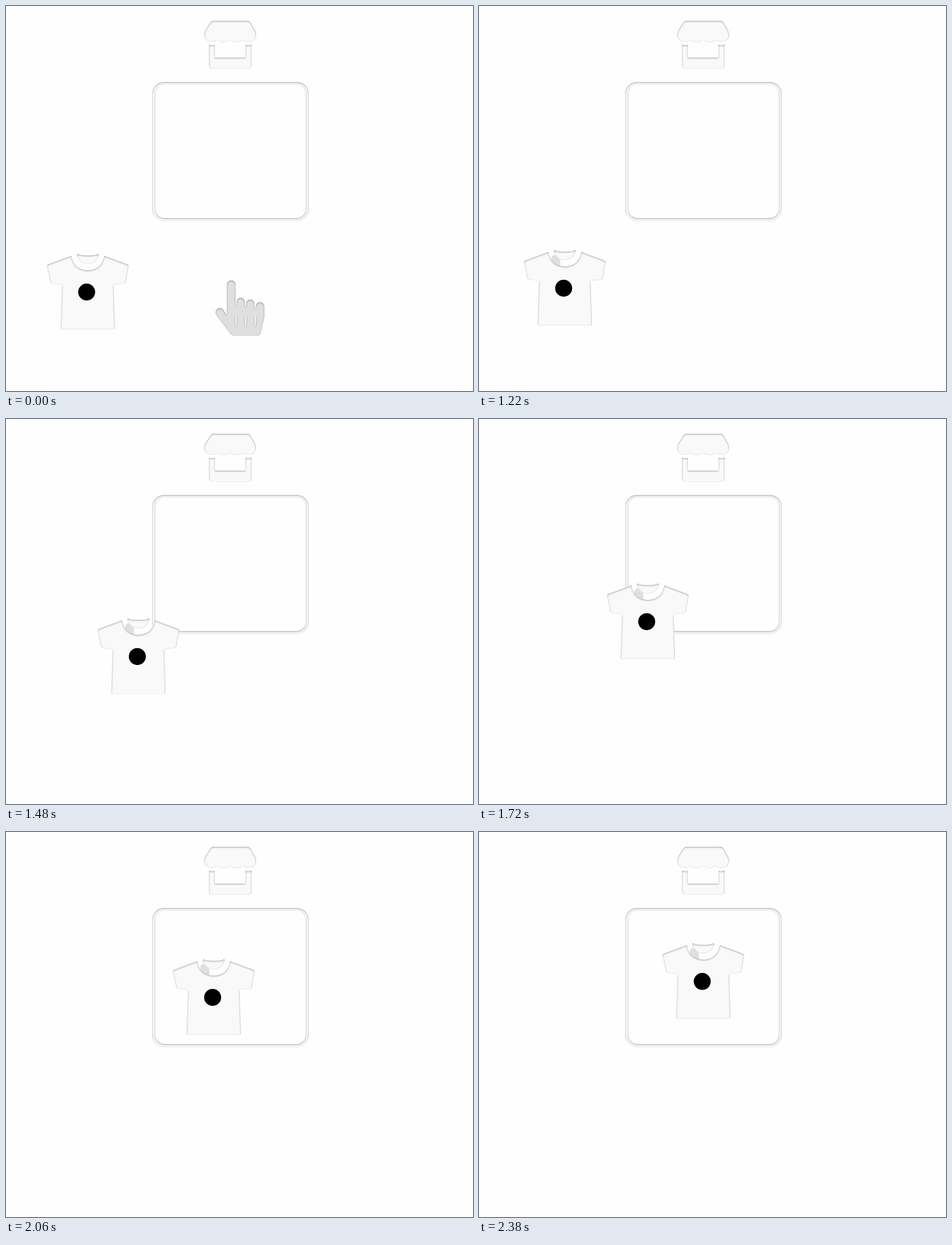
Recreate the animation shown at these times as an HTML page with a canvas. Size 825 px wide and 679 px high, loop 2400 ms.

```html
<!DOCTYPE html>
<html lang="en">
<head>
<meta charset="utf-8">
<title>Shirt to shop</title>
<style>
html, body { margin: 0; width: 100%; height: 100%; overflow: hidden; background: #fefefe; }
canvas { display: block; }
</style>
</head>
<body>
<canvas id="stage" width="825" height="679"></canvas>
<script>
const ctx = document.getElementById('stage').getContext('2d');
const LOOP = 2400, STEP = 20, FAR = 3000;
const PAPER = '#fefefe', LIGHT = '#f9f9f9', GREY = '#dfdfdf';

const awning = new Path2D(`M367 26H426Q430 26 432 29L440 43Q442 47 442 51C442 58 437 63 431 63
  Q424 64 419 60Q413 64 407.500 64Q401 64 396 60Q391 64 384.500 64Q378 64 373 60Q368 64 361 63
  C355 63 350 58 350 51Q350 47 352 43L361 29Q363 26 367 26Z`);
const counter = new Path2D(`M358.500 68Q364 70 369 68.500V91H423V68.500Q428 70 434 68V104
  Q434 111 427 111H366Q358.500 111 358.500 104Z`);

const frame = new Path2D();
frame.roundRect(258, 134, 277, 245.5, 21);
frame.roundRect(264, 139, 265.5, 235, 16);

const collar = new Path2D(`M126 437Q130 440 145 440Q159 440 163 437Q165 439 163 442
  C160 450 154 455 145 455C135 455 129 450 126 443Q124 439 126 437Z`);
const shirt = new Path2D(`M115.500 440.500C118 457 129 466 145 466C160 466 171 457 173.500 440.500
  L214 455.500Q217 457 216.500 460L212 486Q211.500 489 208 489.500L190 491.500L192.500 567
  Q192.500 570.500 189 570.500H100Q96.500 570.500 96.500 567L99 491.500L82 489.500
  Q78.500 489 78 486L72.700 460Q72 457 75 455.500Z`);
const thumb = new Path2D('M121 452Q121 446 126 446Q129 446 131 449L136.500 454.500V469L121 460Z');

const hand = new Path2D(`M390 545V491.500A7.750 7.750 0 0 1 405.500 491.500V528L407 529V522
  A7.500 7.500 0 0 1 422 522V529L424 530V525A7.500 7.500 0 0 1 439 525V532L441 533V530
  A7.700 7.700 0 0 1 456.500 530V549L449.500 577Q448 581.500 444 581.500H403
  Q399 581.500 396 578L372 546C369 541 370 535 375 533Q380 531.500 383 535Z`);
for (const x of [405.5, 422.5, 439.5]) hand.rect(x, 546, 1.8, 18);

// Filled shape with a soft shadow falling inward from its upper edges.
function emboss(path, color, dx = 0, dy = 0) {
  const outside = new Path2D();
  outside.rect(-500, -500, 2000, 2000);
  outside.addPath(path);
  ctx.save();
  ctx.translate(dx, dy);
  ctx.fillStyle = color;
  ctx.fill(path, 'evenodd');
  ctx.clip(path, 'evenodd');
  ctx.translate(-FAR, 0);
  ctx.shadowColor = 'rgba(0,0,0,.36)';
  ctx.shadowBlur = 3;
  ctx.shadowOffsetX = FAR;
  ctx.shadowOffsetY = 1;
  ctx.fillStyle = '#000';
  ctx.fill(outside, 'evenodd');
  ctx.restore();
}

// cubic-bezier(0, 0, .58, 1)
function easeOut(u) {
  let lo = 0, hi = 1;
  for (let i = 0; i < 24; i++) {
    const s = (lo + hi) / 2;
    if (1.74 * s * s - 0.74 * s ** 3 < u) lo = s; else hi = s;
  }
  return lo * lo * (3 - 2 * lo);
}

function drawShirt(t) {
  const k = t > 1200 ? easeOut((t - 1200) / 1200) : 0;
  const dx = 252 * k, dy = -241 * k;
  if (k > 0) {
    ctx.save();
    ctx.translate(dx, dy);
    ctx.fillStyle = GREY;
    ctx.fill(thumb);
    ctx.restore();
  }
  emboss(collar, LIGHT, dx, dy);
  emboss(shirt, LIGHT, dx, dy);
  ctx.fillStyle = '#000';
  ctx.beginPath();
  ctx.arc(142.5 + dx, 504.5 + dy, 15, 0, Math.PI * 2);
  ctx.fill();
}

function draw(now) {
  const t = Math.floor((now % LOOP) / STEP) * STEP;
  ctx.fillStyle = PAPER;
  ctx.fillRect(0, 0, 825, 679);
  emboss(awning, LIGHT);
  emboss(counter, LIGHT);
  emboss(frame, LIGHT);
  drawShirt(t);
  const alpha = Math.min(1, (240 - t) / 220);
  if (alpha > 0) {
    ctx.globalAlpha = alpha;
    emboss(hand, GREY);
    ctx.globalAlpha = 1;
  }
}

let start;
function tick(now) {
  start ??= now;
  draw(now - start);
  requestAnimationFrame(tick);
}
draw(0);
requestAnimationFrame(tick);
</script>
</body>
</html>
```
